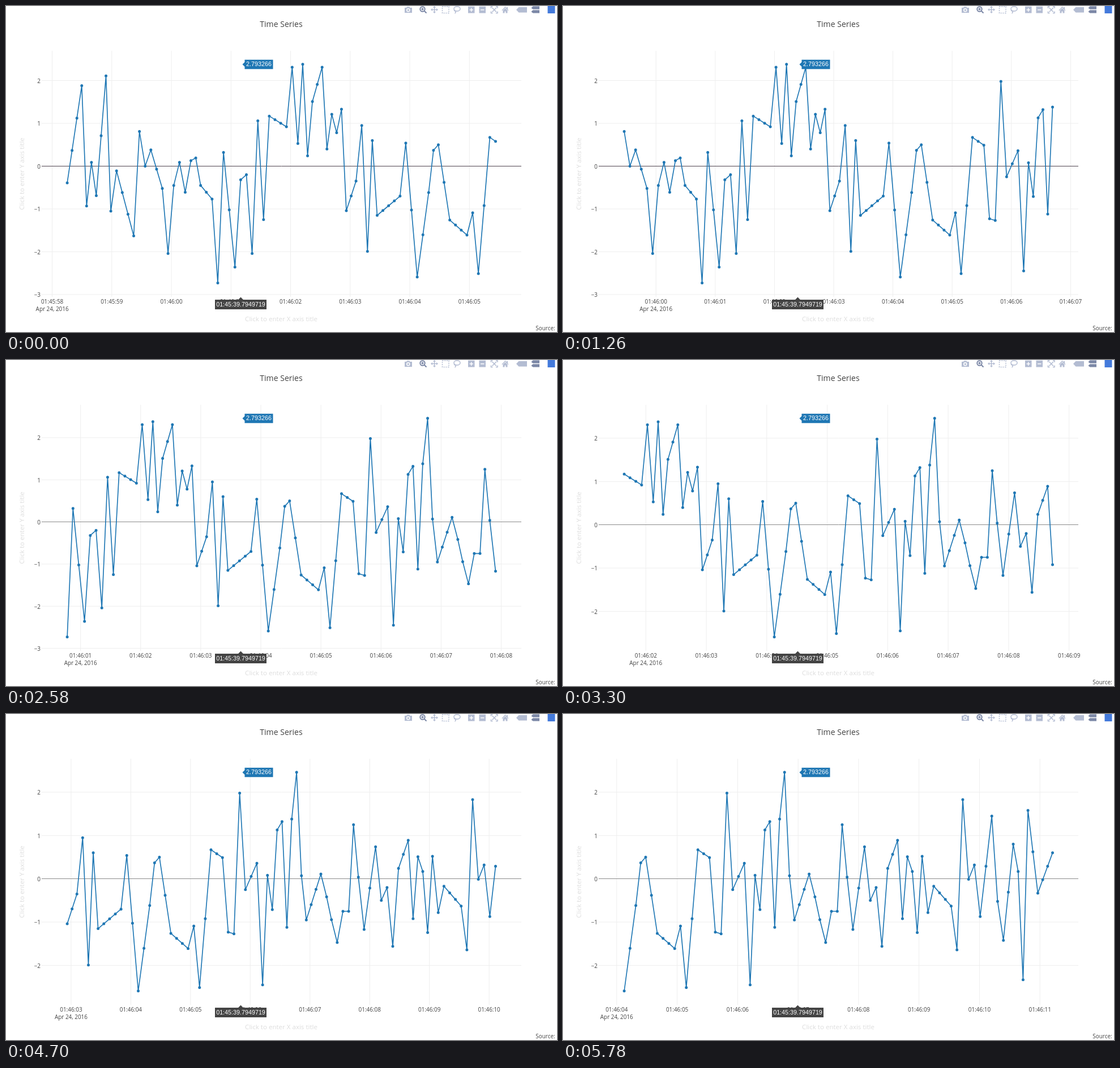
Write an HTML page with a canvas that moves like this. It is 973 px wide and 575 px high and loops after 5950 ms.

```html
<!DOCTYPE html>
<html lang="en">
<head>
<meta charset="utf-8">
<title>Time Series</title>
<style>
  html, body { margin: 0; width: 100%; height: 100%; overflow: hidden; background: #fff; }
  canvas, svg { position: absolute; left: 0; top: 0; }
  svg { font-family: "Open Sans", sans-serif; fill: #444; text-anchor: middle; }
  .hint { font-size: 11.57px; fill: #ddd; }
  .hover { font: 10.75px "Liberation Sans", Arial, sans-serif; }
  .hover text { fill: #fff; }
  .bar { fill: #b3bcd2; }
  .bar .line { fill: none; stroke: #b3bcd2; stroke-width: 1.5; }
  .bar .cut { fill: none; stroke: #fff; stroke-width: 1.5; }
  .bar .on { fill: #7b87a6; }
  .bar .on.line { fill: none; stroke: #7b87a6; stroke-width: 2; }
</style>
</head>
<body>
<canvas id="plot" width="973" height="575"></canvas>
<svg width="973" height="575">
  <text x="486" y="37.3" font-size="14.05">Time Series</text>
  <text class="hint" x="486" y="556">Click to enter X axis title</text>
  <text class="hint" transform="translate(31.5 296) rotate(-90)">Click to enter Y axis title</text>
  <text x="952.5" y="571.5" font-size="9.92">Source:</text>
  <g class="hover">
    <path fill="#1f77b4" d="M417.5 103l4-4v-4.3h50v16.6h-50v-4.3z"/>
    <text x="446.5" y="106.3">2.793266</text>
    <path fill="#444" d="M414.5 513.5l4.5 4.5h41v17h-91v-17h41z"/>
    <text x="414.5" y="530">01:45:39.7949719</text>
  </g>
  <g class="bar">
    <path d="M704 3h3l1-1.5h4.5l1 1.5h3.5v9h-13z"/>
    <circle class="cut" cx="710.3" cy="7.3" r="2.5"/>
    <circle class="on line" cx="735.5" cy="5.5" r="4.2"/>
    <path class="on line" d="M738.5 8.5l4 4M733.5 5.5h4M735.5 3.5v4"/>
    <path class="line" d="M752 6.5h9M756.5 2v9"/>
    <path d="M756.5 0l2.5 3h-5zM756.5 13l2.5-3h-5zM750 6.5l3-2.5v5zM763 6.5l-3-2.5v5z"/>
    <rect class="line" x="770.5" y="1" width="11.5" height="11.5" stroke-dasharray="2 1.8"/>
    <ellipse class="line" cx="796.5" cy="5" rx="5.5" ry="4"/>
    <path class="line" d="M791.5 7q0 2 2 2q2 2-1 4"/>
    <path d="M816 1h11.5v11.5h-11.5zM835.5 1h11.5v11.5h-11.5z"/>
    <path class="cut" d="M818.5 6.7h6.5M821.7 3.5v6.5M838 6.7h6.5"/>
    <path class="line" d="M856.5 4v-3h3M865 1h3v3M868 9.5v3h-3M859.5 12.5h-3v-3M858.5 3l7.5 7.5M866 3l-7.5 7.5"/>
    <path d="M875.5 7.5l6-6.5 2.5 2.7v-1.7h2v4l1.5 1.5-1 .8-5-5.3-5 5.3zM877.5 8l4-4 4 4v4.5h-3v-3h-2v3h-3z"/>
    <path d="M901 6.7l4.5-4.7h14.5v9.5h-14.5z"/>
    <path class="on" d="M927.5 3.5l3-3h11.5v5.3h-11.5zM927.5 10l3-2.7h11.5v5.3h-11.5z"/>
    <rect x="956.5" y="0" width="13" height="13" fill="#447adb"/>
  </g>
</svg>
<script>
const LOOP = 5950, FIRST_SECOND = 58.252, WINDOW = 80, COUNT = 145;
const LEFT = 63, RIGHT = 910, TOP = 79, BOTTOM = 513;
const ctx = document.getElementById('plot').getContext('2d');

// Turning points of the signal; samples left out lie on the line between neighbours
const turns = [
  -.39,,, 1.88, -.93, .09, -.69,, 2.11, -1.05, -.11,,, -1.63, .81, 0, .38,, -.52, -2.04,
  -.45, .09, -.61, .13, .19, -.45,, -.77, -2.73, .32,, -2.36, -.32, -.2, -2.04, 1.06, -1.25, 1.17,,,
  .92, 2.31, .53, 2.38, .24, 1.51,, 2.31, .4, 1.21, .78, 1.33, -1.04,, -.35, .95, -1.99, .6, -1.15,,
  ,, -.7, .54,, -2.59,,, .37, .5,, -1.26,,, -1.61, -1.09, -2.51,, .67,,
  .49, -1.23, -1.27, 1.98, -.25,, .36, -2.45, .08, -.71, 1.13, 1.32, -1.12, 1.38, 2.46, .07, -.95,,, .11,
  ,, -1.47, -.75, -.75, 1.25,, -1.17,, .74, -.5, -.2, -1.56, .24,, .89, -.92, .51, .17, -1.24,
  .52, -.78, -.17,,, -.63, -1.64, 1.83, -.01, .32, -.87,, 1.45, -.52, -1.42,, .8, .17, -2.33, 1.58,
  , -.33,,, .6
];

function valueAt(i) {
  let a = i, b = i;
  while (!(a in turns)) a--;
  while (!(b in turns)) b++;
  return a === b ? turns[a] : turns[a] + (turns[b] - turns[a]) * (i - a) / (b - a);
}
const values = Array.from({ length: COUNT }, (_, i) => valueAt(i));

// Samples come every 96 ms, faster in these spans of sample numbers
const fast = [[1, 9], [24, 25], [43, 54], [57, 58], [68, 69], [88, 99], [101, 101], [105, 106], [114, 120], [135, 144]];
const times = [0];
for (let i = 1; i < COUNT; i++)
  times.push(times[i - 1] + (fast.some(([a, b]) => i >= a && i <= b) ? 81.3 : 96));

// Bursts of evenly spaced redraws: first, last, count
const bursts = [[180, 1180, 9], [1260, 1500, 2], [1820, 2810, 8], [2890, 3910, 9], [4140, 5170, 8], [5340, 5780, 5]];
const redraws = [0];
for (const [first, last, count] of bursts)
  for (let i = 0; i < count; i++) redraws.push(first + (last - first) * i / (count - 1));

function line(x1, y1, x2, y2, color) {
  ctx.strokeStyle = color;
  ctx.lineWidth = 1;
  ctx.beginPath();
  ctx.moveTo(x1, y1);
  ctx.lineTo(x2, y2);
  ctx.stroke();
}

function text(str, x, y, align) {
  ctx.textAlign = align;
  ctx.fillText(str, x, y);
}

function draw(now) {
  const t = redraws.findLast(r => r <= now % LOOP + 30);
  const end = times.findLastIndex(ms => ms <= 7214 + t) + 1;
  const start = end - WINDOW;
  const shown = values.slice(start, end);
  const lo = Math.min(...shown), hi = Math.max(...shown);
  const t0 = times[start], t1 = times[end - 1];
  const toX = ms => 108.1 + (ms - t0) / (t1 - t0) * 756.4;
  const toY = v => 488.5 - (v - lo) / (hi - lo) * 385.7;

  ctx.clearRect(0, 0, 973, 575);
  ctx.font = '9.92px "Open Sans", sans-serif';
  ctx.fillStyle = '#444';

  let dated = false;
  for (let s = 58; s < 73; s++) {
    const x = toX((s - FIRST_SECOND) * 1000);
    if (x < LEFT || x > RIGHT) continue;
    line(x, TOP, x, BOTTOM, '#eee');
    text(`01:${s < 60 ? 45 : 46}:${String(s % 60).padStart(2, '0')}`, x, 525, 'center');
    if (!dated) text('Apr 24, 2016', x, 537.5, 'center');
    dated = true;
  }
  for (let v = -3; v <= 3; v++) {
    const y = toY(v);
    if (y < TOP || y > BOTTOM) continue;
    if (v) line(LEFT, y, RIGHT, y, '#eee');
    text(String(v).replace('-', '\u2212'), 61, y + 4.3, 'right');
  }
  const zero = Math.floor(toY(0)) + .5;
  line(LEFT, zero, RIGHT, zero, hi < 2.4 ? '#4f444f' : '#8c8c8c');

  const points = shown.map((v, i) => [toX(times[start + i]), toY(v)]);
  ctx.strokeStyle = ctx.fillStyle = '#1f77b4';
  ctx.lineWidth = 1.66;
  ctx.lineJoin = 'round';
  ctx.beginPath();
  for (const p of points) ctx.lineTo(...p);
  ctx.stroke();
  ctx.beginPath();
  for (const [x, y] of points) {
    ctx.moveTo(x, y);
    ctx.arc(x, y, 2.5, 0, 7);
  }
  ctx.fill();
}

const began = performance.now();
(function tick() {
  draw(performance.now() - began);
  requestAnimationFrame(tick);
})();
</script>
</body>
</html>
```
